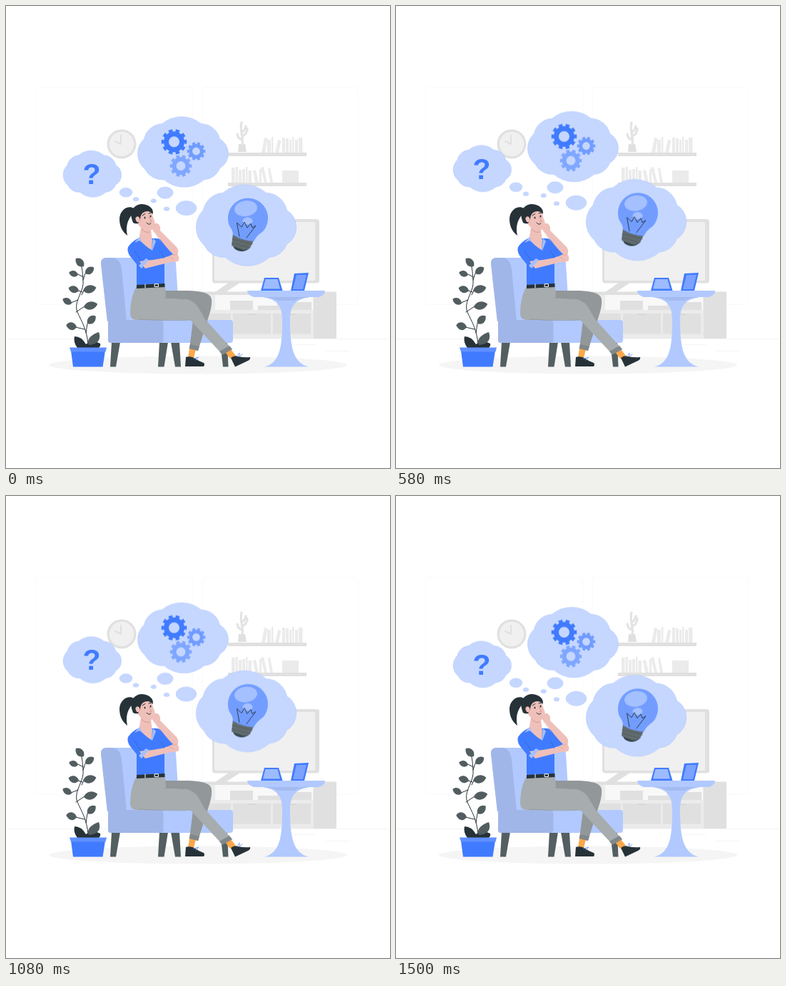
Animation of 538 by 646 pixels, one loop 1.54 s. Source, as an HTML page without scripts:

```html
<!DOCTYPE html>
<html lang="en">
<head>
<meta charset="utf-8">
<title>Thinking</title>
<style>
html, body { margin: 0; width: 100%; height: 100%; overflow: hidden; background: #fff; }
svg { display: block; width: 538px; height: 646px; }
.line { fill: none; stroke-linecap: round; stroke-linejoin: round; }
.ink { stroke: #263238; }
.dark { fill: #263238; }
.wall { fill: #e0e0e0; }
.pale { fill: #ebebeb; }
.blue { fill: #407bff; }
.sky { fill: #b1c9ff; }
.shade { fill: #a1b6e8; }
.leg { fill: #535f61; }
.skin { fill: #efc0b9; }
.sock { fill: #fba749; }
.leaf { fill: #525d60; }
.bubble { fill: #c5d7ff; stroke: #adc6ff; stroke-width: .6; }
.gear { fill: none; stroke: currentColor; }
.thoughts { animation: float 1540ms infinite; }
/* Held at 24 pictures a second: 18 rising, 19 sinking */
@keyframes float {
  0% { transform: translateY(.1px); animation-timing-function: steps(18); }
  48.64% { transform: translateY(-10.2px); animation-timing-function: step-end; }
  48.65% { transform: translateY(-9.5px); animation-timing-function: steps(19); }
  100% { transform: translateY(1.3px); }
}
</style>
</head>
<body>
<svg viewBox="0 0 538 646">
  <defs>
    <path id="cloud" class="bubble" vector-effect="non-scaling-stroke" d="M-29-39A43 43 0 0 1 26-39A27 27 0 0 1 52-18A23.5 23.5 0 0 1 52 23A25 25 0 0 1 30 39A43 43 0 0 1-26 39A28 28 0 0 1-53 24A28 28 0 0 1-54-18A27 27 0 0 1-29-39Z"/>
    <g id="gear" class="gear">
      <circle r="11" stroke-width="7"/>
      <circle r="15.8" stroke-width="4" pathLength="20" stroke-dasharray="1.1 .9" stroke-dashoffset=".55"/>
    </g>
    <path id="leaf" class="leaf" d="M0 0C-2-8-11-10-16-4C-13 4-5 6 0 0Z"/>
  </defs>

  <g class="line" stroke="#fafafa">
    <rect x="41.500" y="113.500" width="220" height="304" rx="4"/>
    <rect x="275" y="113.500" width="218" height="304" rx="4"/>
    <path stroke="#f5f5f5" d="M0 465.500H536M448 482.500H481M403 473.500H434"/>
  </g>
  <ellipse cx="269" cy="502" rx="209" ry="12.500" fill="#f5f5f5"/>

  <g id="clock">
    <circle class="wall" cx="162" cy="193" r="20.500"/>
    <circle cx="162" cy="193" r="17.300" fill="#f0f0f0"/>
    <path class="line" stroke="#e0e0e0" stroke-width="2" d="M161 181V193L153 189"/>
  </g>

  <g id="shelves">
    <path class="wall" d="M311 205H421V210H311ZM311 247H421V252H311ZM325 204L326 193H335L337 204Z"/>
    <path class="line" stroke="#e3e3e3" stroke-width="3.200" d="M331 194C333 183 327 174 330 163M331 187Q325 186 324 179M331 182Q338 179 338 171M330 177Q335 174 336 168"/>
    <path class="pale" d="M358 205L362 184L366.500 185L363 205ZM366 187H371V205H366ZM372 183H374.500V205H372ZM377 205L381 187L385.500 188L382 205ZM387 184H391V205H387ZM392 185H396V205H392ZM397 187H400V205H397ZM401 183H403.500V205H401ZM405 187H409V205H405ZM410 184H415.500V205H410Z"/>
    <path class="pale" d="M316 226H320.500V247H316ZM321.500 225H325V247H321.500ZM326 229H330V247H326ZM331 228H335V247H331ZM336 225H338.500V247H336ZM339.500 230H344V247H339.500ZM346 230L350 229L354 247H349ZM355 228H358V247H355ZM357 226L361 225L366 247H362ZM367 226H370L374 247H370ZM387 230H410V247H387Z"/>
  </g>

  <g id="television">
    <path class="pale" d="M262 402H435V465H262Z"/>
    <path fill="#f8f8f8" d="M293 404H430V425H293Z"/>
    <path class="wall" d="M265 399.500H463V465H431V404H265ZM314 412H346V425H314ZM353 419H380V414H428V425H353ZM318 430H371V458.500H318ZM374 430H427V458.500H374ZM265 430H315V458.500H265Z"/>
    <path fill="#d8d8d8" d="M338 430H351V432H338ZM393 430H406V432H393Z"/>
    <path class="wall" d="M312 387H328L308 400H293Z"/>
    <rect class="wall" x="289" y="298" width="150" height="89.500" rx="4"/>
    <rect x="292" y="302" width="141" height="82" rx="2" fill="#f0f0f0"/>
  </g>

  <g id="chair">
    <path class="leg" d="M148 470H160L154 504.500H146ZM215 470H227L221.500 504.500H213ZM231 470H243L245 504.500H237ZM300 470H310L311.500 504.500H304Z"/>
    <path class="sky" d="M133 360Q133 352 141 352H229Q237 352 238 360L243 441H142Z"/>
    <path class="shade" d="M133 360Q133 352 141 352H147Q160 352 162 368L169 441H142Z"/>
    <rect class="sky" x="143" y="439" width="175" height="32" rx="4"/>
    <path class="shade" d="M147 439H216Q220.500 440 220.500 444V467Q220 471 216 471H147Q143 471 143 467V443Q143 439 147 439Z"/>
  </g>

  <g id="plant">
    <path class="line ink" stroke-width="1" d="M115 475C114 450 102 435 99 425C96 411 110 398 108 383C107 370 107 365 103 357M108 379L101 375M108 383L111 374M107 400L101 398M106 404L109 398M101 411L91 415M98 428L110 420M110 452L97 449M112 457L114 444"/>
    <use href="#leaf" transform="translate(109 364) rotate(30) scale(.95)"/>
    <use href="#leaf" transform="translate(101 376) scale(.8)"/>
    <use href="#leaf" transform="translate(111 374) scale(-.9 .9) rotate(20)"/>
    <use href="#leaf" transform="translate(102 398) scale(.9)"/>
    <use href="#leaf" transform="translate(108 398) scale(-1.150 1.050)"/>
    <use href="#leaf" transform="translate(92 416) rotate(12) scale(.85)"/>
    <use href="#leaf" transform="translate(109 421) scale(-1.200 1.050)"/>
    <use href="#leaf" transform="translate(99 449) rotate(-6) scale(.9 1)"/>
    <use href="#leaf" transform="translate(114 444) scale(-.95 .95) rotate(28)"/>
    <path class="dark" d="M100 478Q94 470 96 462Q106 462 112 473Q122 466 132 472Q133 475 130 478Z"/>
    <path class="leaf" d="M116 474C112 465 121 459 130 456C133 464 131 473 116 474Z"/>
    <path class="blue" d="M91 482H139L135.500 504.500H94Z"/>
    <path fill="#6090ff" d="M89 477.500H141L139.500 483.500H91Z"/>
  </g>

  <g id="table">
    <path class="sky" d="M338 398H447Q447 404 439 407H426C404 410 398 420 398 440C398 476 402 499 424 504.500H362C384 499 387 476 387 440C387 420 381 410 359 407H347Q338 404 338 398Z"/>
    <path fill="#a3bbef" d="M361 407H424Q409 409 404 412H381Q374 408 361 407Z"/>
    <path class="blue" d="M357 398L362 380H382L387.500 398ZM399 398L404 374L424 373L418 398Z"/>
    <path fill="#9dbbff" d="M360 395.500L363.500 382H380.500L384 395.500Z"/>
    <path fill="#7ba2ff" d="M402 396L407 376H421L416 396Z"/>
  </g>

  <g id="woman">
    <path class="sock" d="M257 479L266 480L263 492H255Z"/>
    <path class="dark" d="M252 491Q257 489 264 492Q270 497 277 499Q279 501 277 504H251Z"/>
    <path fill="#92979a" d="M222 398H257Q287 399 288 410Q289 420 284 434L269 482L257 479L263 432L222 418Z"/>
    <path fill="#82888a" d="M258 473L271 476L269 482L256.500 479Z"/>
    <path class="sock" d="M307 484L315 480L322 489L314 493Z"/>
    <path class="dark" d="M315 492Q320 488 325 490Q334 492 342 491Q343 494 339 496L321 504.500Z"/>
    <path class="line" stroke="#82a8ff" stroke-width="1" d="M263 493L270 491L266 495M324 490L327 485L327 490L331 487"/>
    <path fill="#a7acae" d="M183 392H223L224 408L250 409.500Q265 411 272 426L279 438L317 480L303 487L258 439H184Q174 439 174 430C174 415 177 402 183 392Z"/>
    <path class="line" stroke="#8d9395" stroke-width=".7" d="M223 408L250 409.500M187 438Q235 441 258 439"/>
    <path fill="#82888a" d="M313 475L317 480L303 488L299 483Z"/>

    <path class="skin" d="M190 304L203 312L205 330L204 341L186 328Z"/>
    <path class="skin" d="M216 327L238 349Q244 352 241 357L232 356L219 348Z"/>
    <path class="blue" d="M187 324Q176 329 171 337Q169 343 174 350L183 361V390H222V352L235 347Q235 337 225 330Q215 324 204 325L204 339Z"/>
    <path fill="#a4c0ff" d="M180 331L187 323Q194 333 204 341L206 325L210 329L205 342Q192 332 187 328Z"/>
    <path class="skin" d="M188 326Q193 335 204 341L205 327L201 319Z"/>
    <path class="line" stroke="#2d60d5" stroke-width=".7" d="M180 342L189 356M222 352L217 344"/>
    <path class="dark" d="M183 390L222.500 388V393L183 395Z"/>
    <path class="line" stroke="#fff" stroke-width="1" d="M195 389V394M208.500 388.700H213.500V392.500H208.500Z"/>

    <path class="skin" d="M208 315Q202 311 203 307Q207 303 212 304Q217 307 216 314L239 337Q243 343 240 347L235 348Q223 337 208 315Z"/>
    <path class="skin" d="M187 357Q209 355 229 351Q234 345 240 347Q243 350 242 355Q238 359 231 358L195 367Z"/>
    <path fill="#a4c0ff" d="M186 363L196 353L200 355L190 367Z"/>
    <path class="line" stroke="#d99f98" stroke-width=".7" d="M207 315L217 329M229 351L235 354M234 348Q239 349 240 346"/>

    <path class="dark" d="M179 283C172 278 160 284 159 297C159 309 163 315 170 321C167 307 171 298 178 290Z"/>
    <path class="skin" d="M183 291Q188 281 200 284Q205 288 206 295L209 303Q207 305 205 305Q207 311 202 315Q196 319 189 310L183 303Z"/>
    <path class="dark" d="M178 303Q172 288 179 282Q187 274 199 279Q207 283 206 291Q199 284 192 289Q188 292 188 299L185 304Q181 305 178 303Z"/>
    <ellipse class="skin" cx="184.500" cy="298.500" rx="3" ry="4" transform="rotate(-18 184 298)"/>
    <path class="skin" d="M203 306Q208 303 213 305Q217 309 215 314L208 316Q204 312 203 306Z"/>
    <path class="line ink" stroke-width="1" d="M191 293L195 290.500M200 290L204 289M197 303Q200 307 203 304"/>
    <path class="line" stroke="#c98982" stroke-width=".7" d="M200 295L204 301L201 302M190 312Q195 318 201 316"/>
    <ellipse class="dark" cx="194.500" cy="296" rx="1" ry="1.500"/>
    <ellipse class="dark" cx="202.500" cy="294" rx="1" ry="1.500"/>
  </g>

  <g class="thoughts">
    <g class="bubble">
      <ellipse cx="168" cy="260.500" rx="8.800" ry="6.300"/>
      <ellipse cx="182" cy="270" rx="3.800" ry="2.600"/>
      <ellipse cx="206.800" cy="272.300" rx="3.600" ry="2.600"/>
      <ellipse cx="223" cy="261" rx="11" ry="8"/>
      <ellipse cx="225" cy="283.500" rx="3.800" ry="2.600"/>
      <ellipse cx="252.500" cy="282.500" rx="14.300" ry="10"/>
    </g>
    <use href="#cloud" transform="translate(120.500 234.500) scale(.64 .66)"/>
    <use href="#cloud" transform="translate(247.500 203.700)"/>
    <use href="#cloud" transform="translate(336 306.300) scale(1.105 1.155)"/>
    <text class="blue" x="120" y="249" text-anchor="middle" font-family="Liberation Sans, Arial, sans-serif" font-size="41" font-weight="700">?</text>
    <use href="#gear" color="#407bff" transform="translate(235.500 189.800)"/>
    <use href="#gear" color="#719cff" transform="translate(266.500 203) scale(.72)"/>
    <use href="#gear" color="#80a7ff" transform="translate(245 223.500) scale(.86)"/>

    <g id="bulb">
      <path fill="#37474f" d="M318 335L341 339Q333 345 325 342Q319 340 318 335Z"/>
      <path fill="#616b6e" d="M318 318L348 326L342 338Q338 341 333 341L316 335Z"/>
      <path class="line" stroke="#505b5e" stroke-width=".8" d="M317 326L345 333M317 331L342 338"/>
      <path fill="#729dff" d="M311 297A28 28 0 1 1 360 315Q351 321 347 329Q331 328 318 320Q318 314 314 309Q311 304 311 297Z"/>
      <ellipse cx="336" cy="283" rx="16" ry="10.800" fill="#a4c0ff" transform="rotate(-8 336 283)"/>
      <ellipse cx="338.500" cy="300.500" rx="7" ry="5" fill="#a4c0ff"/>
      <path class="line ink" stroke-width=".9" d="M327 322L323.500 303L330 309L334 302L338 310L343 304L345 310L350 307L337 324"/>
    </g>
  </g>
</svg>
</body>
</html>
```
